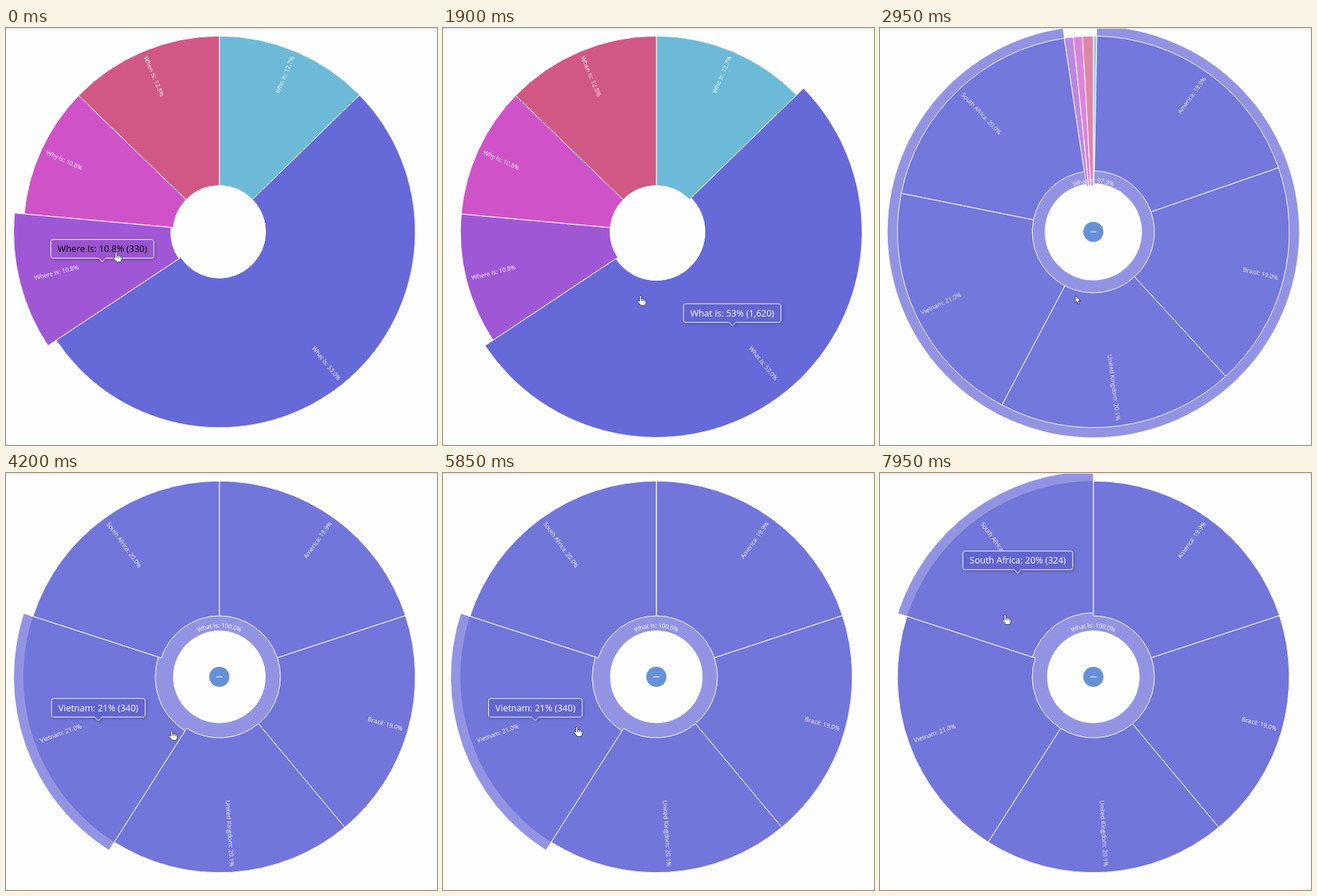
These frames come from a looping animation (600x581 px, 8 s). An HTML page with a canvas:

```html
<!DOCTYPE html>
<html>
<head>
<meta charset="utf-8">
<style>
html, body { margin: 0; height: 100%; overflow: hidden; background: #fefdff; }
canvas { display: block; }
</style>
</head>
<body>
<canvas id="stage" width="600" height="581"></canvas>
<script>
const ctx = document.getElementById('stage').getContext('2d');
const LOOP = 8000, CX = 297, CY = 284, HOLE = 64.4, RING = 85, OUTER = 272.8;
const TAU = Math.PI * 2, FONT = '"Open Sans", sans-serif';
const ZOOM_START = 2395, CLICK = 2150;
const BLUE = [102, 105, 216];

const clamp = v => Math.max(0, Math.min(1, v));
const ramp = (t, start, length) => clamp((t - start) / length);
const smooth = v => v * v * (3 - 2 * v);
const mix = (a, b, k) => a + (b - a) * k;
const mixColor = (a, b, k) => a.map((v, i) => mix(v, b[i], k));
const rgb = c => `rgb(${c.map(Math.round)})`;
const cubicInOut = v => v < .5 ? 4 * v ** 3 : 1 - 4 * (1 - v) ** 3;

function slices(rows) {
  const total = rows.reduce((sum, row) => sum + row[1], 0);
  let at = 0;
  return rows.map(([name, value, color = BLUE]) => {
    const slice = { name, value, color, from: at / total, to: (at + value) / total };
    at += value;
    return slice;
  });
}

const parents = slices([
  ['Who Is', 388, [108, 186, 216]],
  ['What Is', 1620],
  ['Where Is', 330, [160, 87, 214]],
  ['Why Is', 330, [208, 82, 201]],
  ['When Is', 390, [209, 88, 132]]
]);
const children = slices([
  ['America', 323], ['Brazil', 308], ['United Kingdom', 325], ['Vietnam', 340], ['South Africa', 324]
]);
const [, what, where] = parents;
const [, , kingdom, vietnam, africa] = children;

const polar = (turn, r) => [CX + r * Math.sin(turn * TAU), CY - r * Math.cos(turn * TAU)];
const middle = (slice, r) => polar((slice.from + slice.to) / 2, r);

// slice, hover start, hover end, tooltip text, tooltip point
const hovers = [
  [where, -1000, 735, 'Where Is: 10.8% (330)', middle(where, 168)],
  [what, 735, 3080, 'What Is: 53% (1,620)', middle(what, 168)],
  [kingdom, 3130, 3350, 'United Kingdom: 20.1% (325)', middle(kingdom, 179)],
  [vietnam, 3350, 4300, 'Vietnam: 21% (340)', middle(vietnam, 179)],
  [what, 4300, 5000, 'What Is: 100% (1,620)', polar(.5, 168)],
  [kingdom, 5000, 5500, 'United Kingdom: 20.1% (325)', middle(kingdom, 179)],
  [vietnam, 5500, 6640, 'Vietnam: 21% (340)', middle(vietnam, 179)],
  [africa, 6640, 9999, 'South Africa: 20% (324)', middle(africa, 179)]
];

const pointerPath = [
  [0, 153, 311], [350, 160, 314], [1000, 273, 371], [2300, 275, 372], [2950, 272, 372],
  [3200, 268, 372], [3600, 215, 362], [4050, 220, 360], [4500, 259, 350], [4850, 259, 352],
  [5200, 251, 373], [5400, 248, 373], [5850, 186, 352], [6300, 184, 345], [7150, 174, 196], [8000, 174, 196]
];

function hoverScale(slice, t) {
  let grown = 0;
  for (const [target, start, end] of hovers) {
    if (target === slice) {
      grown = Math.max(grown, smooth(ramp(t, start, 200)) * (1 - ramp(t, end, 320)));
    }
  }
  return 1 + .05 * grown;
}

function sector(from, to, inner, outer, color, alpha, lineAlpha) {
  if (to - from < 1e-4) return;
  const a = (from - .25) * TAU, b = (to - .25) * TAU;
  ctx.beginPath();
  ctx.arc(CX, CY, outer, a, b);
  ctx.arc(CX, CY, inner, b, a, true);
  ctx.closePath();
  ctx.globalAlpha = alpha;
  ctx.fillStyle = rgb(color);
  ctx.fill();
  ctx.globalAlpha = lineAlpha;
  ctx.strokeStyle = '#fff';
  ctx.lineWidth = 1;
  ctx.stroke();
  ctx.globalAlpha = 1;
}

function text(string, x, y, angle, align, alpha) {
  ctx.save();
  ctx.translate(x, y);
  ctx.rotate(angle);
  ctx.globalAlpha = alpha;
  ctx.fillStyle = '#fff';
  ctx.font = `8.5px ${FONT}`;
  ctx.textAlign = align;
  ctx.textBaseline = 'middle';
  ctx.fillText(string, 0, 0);
  ctx.restore();
}

function radialLabel(slice, from, to, alpha) {
  const turn = (from + to) / 2, right = turn < .5;
  const percent = ((slice.to - slice.from) * 100).toFixed(1);
  text(`${slice.name}: ${percent}%`, ...polar(turn, 265),
    (turn + (right ? -.25 : .25)) * TAU, right ? 'right' : 'left', alpha);
}

function curvedLabel(string, radius, alpha) {
  ctx.font = `8.5px ${FONT}`;
  let along = -ctx.measureText(string).width / 2;
  for (const char of string) {
    const width = ctx.measureText(char).width;
    const turn = (along + width / 2) / radius / TAU;
    text(char, ...polar(turn, radius), turn * TAU, 'center', alpha);
    along += width;
  }
}

function drawPie(t) {
  const zoom = cubicInOut(ramp(t, ZOOM_START, 750));
  const faded = ramp(t, CLICK, 350), opened = ramp(t, 2170, 820);
  const start = what.from * (1 - zoom) ** 1.42;
  const end = 1 - (1 - what.to) * (1 - zoom);
  const turnOf = v => v <= what.from ? v / what.from * start : 1 - (1 - v) / (1 - what.to) * (1 - end);
  const byScale = list => [...list].sort((a, b) => hoverScale(a, t) - hoverScale(b, t));

  for (const p of byScale(parents)) {
    const scale = hoverScale(p, t), alpha = 1 - .3 * faded;
    sector(turnOf(p.from), turnOf(p.to), HOLE * scale, OUTER * scale, p.color, alpha, p === what ? 1 - zoom : 1);
  }
  const inside = v => mix(start, end, v);
  if (opened) for (const c of byScale(children)) {
    const scale = hoverScale(c, t);
    sector(inside(c.from), inside(c.to), RING * scale, OUTER * scale, c.color, .7 * opened, opened);
  }

  for (const p of parents) {
    const alpha = p === what && t > CLICK ? 0 : (1 - .5 * faded) * clamp(1 - 5 * zoom);
    if (alpha) radialLabel(p, turnOf(p.from), turnOf(p.to), alpha);
  }
  if (!opened) return;
  for (const c of children) radialLabel(c, inside(c.from), inside(c.to), opened);

  ctx.globalAlpha = ramp(t, CLICK, 200);
  ctx.fillStyle = '#6791d6';
  ctx.beginPath();
  ctx.arc(CX, CY, 14, 0, TAU);
  ctx.fill();
  ctx.fillStyle = '#fff';
  ctx.fillRect(CX - 4.5, CY - .5, 9, 1);
  ctx.globalAlpha = 1;
  if (zoom < .05) text('What Is: 53.0%', CX, 279, Math.PI, 'left', .8);
  else curvedLabel(`What Is: ${((end - start) * 100).toFixed(1)}%`, 71, zoom);
}

function drawTooltip(t) {
  const index = hovers.findIndex(h => t >= h[1] && t < h[2]);
  if (index < 0 || (t > CLICK + 100 && t < 3130)) return;
  const [slice, start, , label, point] = hovers[index];
  const [before, , , , oldPoint] = hovers[Math.max(0, index - 1)];
  const glide = 1 - (1 - ramp(t, start, 375)) ** 3, tint = ramp(t, start, 330);
  const x = mix(oldPoint[0], point[0], glide), y = mix(oldPoint[1], point[1], glide) + .5;
  const ink = s => s === where ? [0, 0, 0] : [255, 255, 255];
  const dim = s => s.color.map(v => v * .96);

  ctx.save();
  ctx.globalAlpha = index === 2 ? ramp(t, start, 150) : 1 - ramp(t, CLICK, 100) * (t < 3000);
  ctx.font = `12.5px ${FONT}`;
  const half = ctx.measureText(label).width / 2 + 9.5, top = y - 31, bottom = y - 5;
  ctx.beginPath();
  ctx.moveTo(x - 5, bottom);
  ctx.lineTo(x, y);
  ctx.lineTo(x + 5, bottom);
  ctx.arcTo(x + half, bottom, x + half, top, 3);
  ctx.arcTo(x + half, top, x - half, top, 3);
  ctx.arcTo(x - half, top, x - half, bottom, 3);
  ctx.arcTo(x - half, bottom, x, bottom, 3);
  ctx.closePath();
  ctx.shadowColor = 'rgba(0,0,0,.4)';
  ctx.shadowBlur = 4;
  ctx.shadowOffsetX = ctx.shadowOffsetY = 1;
  ctx.fillStyle = rgb(mixColor(dim(before), dim(slice), tint));
  ctx.fill();
  ctx.shadowColor = 'transparent';
  ctx.strokeStyle = '#fff';
  ctx.stroke();
  ctx.fillStyle = rgb(mixColor(ink(before), ink(slice), ramp(t, start, 200)));
  ctx.textAlign = 'center';
  ctx.textBaseline = 'alphabetic';
  ctx.fillText(label, x, y - 13.5);
  ctx.restore();
}

const hand = new Path2D('M-1 1Q0-1 1.5 1V5Q3 4 4 5.3Q5.5 4.5 6.3 5.8Q8 5.3 8.2 7V10L7 14H1L-3.3 9Q-4 7-2.3 7L-1 8.3Z');
const handLines = new Path2D('M1.5 5V8M4 5.5V8M6.3 6V8.5');
const arrow = new Path2D('M0 0V10L2.3 8L4 11.5L5.6 10.8L4 7.3H7Z');

function drawPointer(t) {
  const next = Math.max(1, pointerPath.findIndex(p => p[0] > t));
  const a = pointerPath[next - 1], b = pointerPath[next];
  const k = smooth(ramp(t, a[0], b[0] - a[0]));
  const isArrow = t > 2500 && t < 3130, shape = isArrow ? arrow : hand;
  ctx.save();
  ctx.translate(mix(a[1], b[1], k), mix(a[2], b[2], k) + 1);
  ctx.lineWidth = .9;
  ctx.fillStyle = '#fff';
  ctx.strokeStyle = '#33334a';
  ctx.fill(shape);
  ctx.stroke(shape);
  if (!isArrow) ctx.stroke(handLines);
  ctx.restore();
}

function frame(now) {
  const t = now % LOOP;
  ctx.fillStyle = '#fefdff';
  ctx.fillRect(0, 0, 600, 581);
  ctx.fillStyle = '#ececee';
  ctx.fillRect(0, 0, 600, 2);
  ctx.save();
  ctx.beginPath();
  ctx.rect(0, 1, 600, 580);
  ctx.clip();
  drawPie(t);
  ctx.restore();
  drawTooltip(t);
  drawPointer(t);
  requestAnimationFrame(frame);
}
requestAnimationFrame(frame);
</script>
</body>
</html>
```
